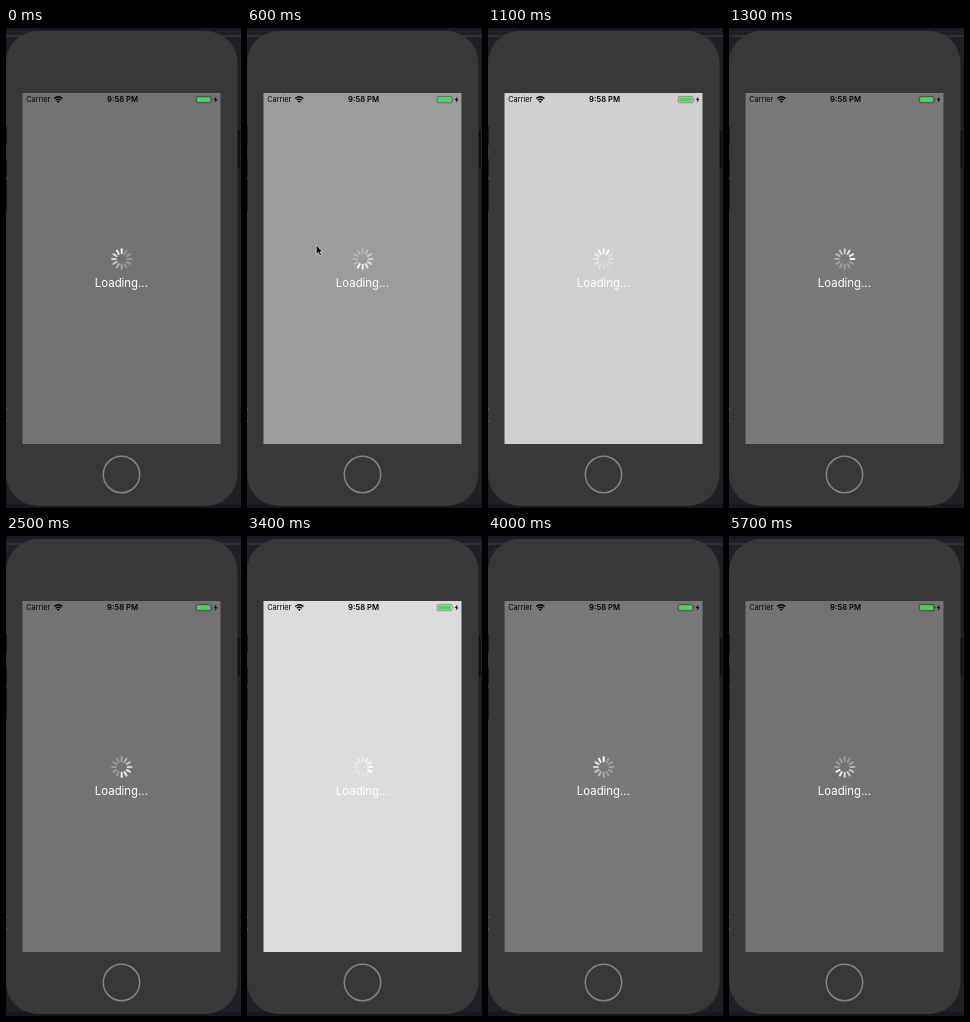
These frames come from a looping animation (235 by 480 pixels, 5800 ms). An HTML page:

```html
<!DOCTYPE html>
<html lang="en">
<head>
<meta charset="utf-8">
<title>Loading overlay</title>
<style>
  html, body { margin: 0; width: 100%; height: 100%; overflow: hidden; background: #1d1b25; }
  svg { display: block; width: 235px; height: 480px; }
  text { font-family: Inter, "Liberation Sans", sans-serif; }
</style>
</head>
<body>
<svg viewBox="0 0 235 480">
  <!-- desktop behind the phone -->
  <rect width="235" height="480" fill="#201f25"/>
  <rect width="235" height="2.5" fill="#1c1728"/>
  <path d="M0 8H20M215 8H235" stroke="#303037" stroke-width="2"/>
  <rect y="476" width="235" height="4" fill="#1a1724"/>

  <!-- phone -->
  <rect x="230" y="102" width="4" height="38" rx="1" fill="#101012"/>
  <rect x="0" y="3" width="231.5" height="475" rx="32" fill="#383838"/>
  <path d="M.5 98V117M.5 131V149M.5 152V183" stroke="#1b1b1d"/>
  <path d="M0 381H1M0 393H1" stroke="#77777c"/>
  <circle cx="115.5" cy="446.5" r="18.2" fill="none" stroke="#858585" stroke-width="1.5"/>
  <rect id="page" x="16.5" y="65" width="198" height="351"/>

  <!-- status bar -->
  <text x="20.2" y="74.2" font-size="7.4">Carrier</text>
  <g fill="none" stroke="#000" stroke-width="1.3">
    <path d="M48.2 70.6Q52.3 66.9 56.4 70.6M49.8 72.2Q52.3 70 54.8 72.2"/>
  </g>
  <path d="M50.9 73.3Q52.3 72.2 53.7 73.3L52.3 74.9Z"/>
  <text x="116.6" y="74.2" font-size="7.7" font-weight="600" text-anchor="middle">9:58 PM</text>
  <rect x="190.2" y="68.4" width="15" height="6.4" rx="1.6" fill="none" stroke="#000" stroke-opacity=".42" stroke-width=".8"/>
  <rect x="191.2" y="69.4" width="12.8" height="4.4" rx=".8" fill="#46d85c"/>
  <path d="M206 70.5Q207.2 71.6 206 72.7Z" opacity=".45"/>
  <path d="M210.4 68.6L207.8 72H209.5L208.7 74.8L211.6 71.2H209.8Z"/>

  <!-- loading view -->
  <g id="spinner" transform="translate(115.7 231)" stroke="#fff" stroke-width="1.9" stroke-linecap="round"></g>
  <text x="115.4" y="258.8" font-size="11.4" fill="#fff" text-anchor="middle">Loading...</text>

  <path id="cursor" d="M0 0V9.2L2.1 7.3L3.6 10.6L5.2 9.9L3.8 6.7H6.5Z" stroke="#fff" stroke-width=".6"/>
</svg>
<script>
const LOOP = 5800, STEP = 100, SPOKES = 12;
const page = document.getElementById('page');
const spinner = document.getElementById('spinner');
const cursor = document.getElementById('cursor');

const spokes = Array.from({ length: SPOKES }, (_, i) => {
  const line = document.createElementNS('http://www.w3.org/2000/svg', 'path');
  line.setAttribute('d', 'M0 -5.8V-9.7');
  line.setAttribute('transform', `rotate(${i * 360 / SPOKES})`);
  return spinner.appendChild(line);
});

const ease = (t, start, length) => {
  const x = Math.min(1, Math.max(0, (t - start) / length));
  return x * x * (3 - 2 * x);
};

// The overlay leaves and returns twice, 2700 ms apart.
const dim = t => [490, 3190].reduce(
  (v, start) => v - ease(t, start, 300) + ease(t, start + 462, 400), 1);

function draw(t) {
  const grey = Math.round(249 - 134 * dim(t));
  page.setAttribute('fill', `rgb(${grey},${grey},${grey})`);

  const head = Math.floor(t * SPOKES / 1000);
  spokes.forEach((line, i) => {
    const age = ((head - i) % SPOKES + SPOKES) % SPOKES;
    line.setAttribute('opacity', Math.max(.28, 1 - age * .105));
  });

  const move = ease(t, 250, 500);
  cursor.setAttribute('transform', `translate(${88.3 * move} ${250 - 42 * move})`);
  cursor.setAttribute('visibility', t >= 300 && t < 1100 ? 'visible' : 'hidden');
}

const begin = performance.now();
function tick() {
  const t = (performance.now() - begin) % LOOP;
  draw(Math.floor(t / STEP) * STEP);
  requestAnimationFrame(tick);
}
tick();
</script>
</body>
</html>
```
